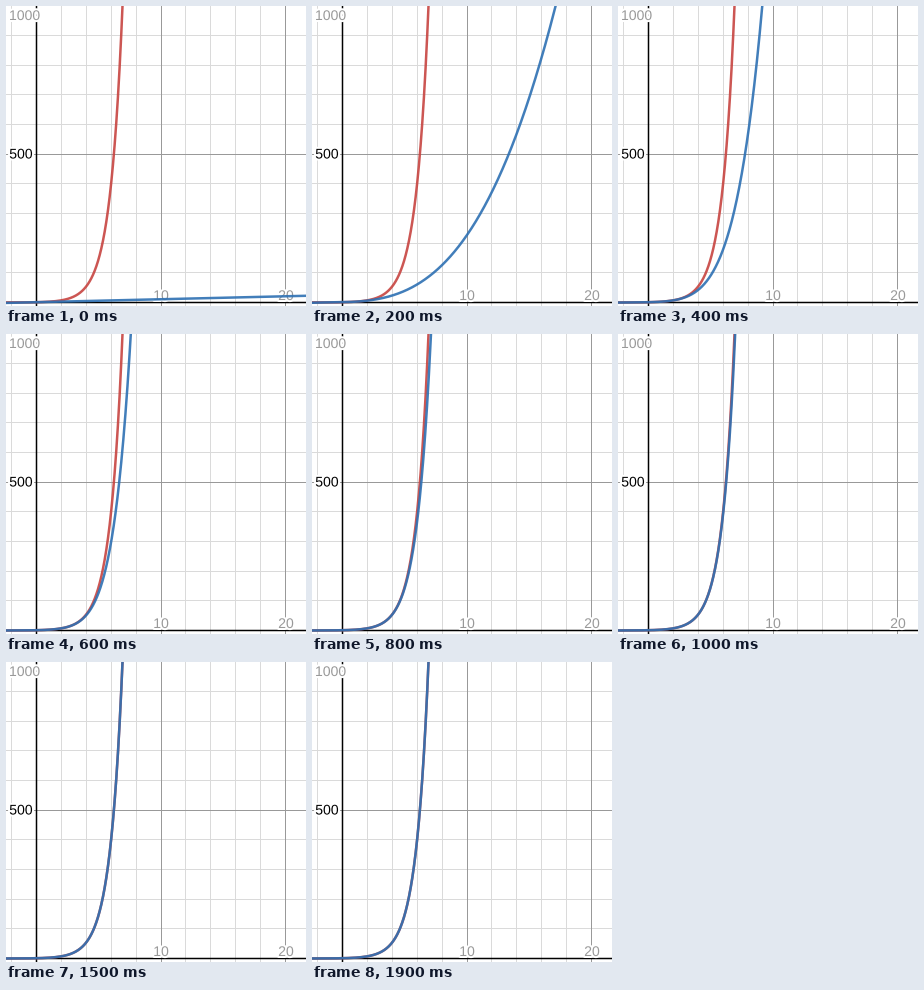
A matplotlib script for the animation above (2000 ms loop, 300 by 300 pixels).

```python
import math
import numpy as np
import matplotlib.pyplot as plt
from matplotlib.animation import FuncAnimation
from matplotlib.patheffects import withStroke

SIZE, DPI = 300, 100
PX = 72 / DPI                 # one pixel in points
X0, Y0 = 30.5, 296.5          # origin on the stage
SX, SY = 12.45, 0.2965        # pixels per unit
FRAMES, INTERVAL = 20, 100
RED, BLUE = "#c74440", "#2d70b3"

fig = plt.figure(figsize=(SIZE / DPI, SIZE / DPI), dpi=DPI, facecolor="white")
ax = fig.add_axes([0, 0, 1, 1])
ax.set_xlim(0, SIZE)
ax.set_ylim(SIZE, 0)
ax.axis("off")


def rule(pos, color, width, vertical):
    ends = [-5, SIZE + 5]
    xy = ([pos, pos], ends) if vertical else (ends, [pos, pos])
    ax.plot(*xy, color=color, lw=width * PX, zorder=1, snap=False)


def label(x, y, text, color, align="center"):
    ax.text(x, y, text, color=color, ha=align, va="baseline", zorder=2,
            family="Liberation Sans", fontsize=14 * PX,
            path_effects=[withStroke(linewidth=4 * PX, foreground="white")])


def curve(color, z):
    line, = ax.plot([], [], color=color, lw=2.5 * PX, alpha=0.9, zorder=z,
                    solid_joinstyle="round")
    return line


def place(line, y):
    keep = y < 1100
    line.set_data(X0 + SX * xs[keep], Y0 - SY * y[keep])


def taylor(degree):
    return sum(xs ** k / math.factorial(k) for k in range(degree + 1))


# Minor lines first so that major lines stay on top
for major in (False, True):
    color = "#999999" if major else "#dadada"
    for u in range(-2, 22, 2):
        if u and (u % 10 == 0) == major:
            rule(math.floor(X0 + SX * u) + 0.5, color, 1, True)
    for v in range(100, 1000, 100):
        if (v % 500 == 0) == major:
            rule(math.floor(Y0 - SY * v) + 0.5, color, 1, False)
rule(X0, "black", 1.5, True)
rule(Y0, "black", 1.5, False)

label(3, 14, "1000", "#999999", "left")
label(26.5, 152.5, "500", "black", "right")
label(155, 294, "10", "#999999")
label(280, 294, "20", "#999999")

xs = np.linspace(-3, 22, 1500)
exp_line = curve(RED, 3)
sum_line = curve(BLUE, 4)
place(exp_line, np.exp(xs))


def update(i):
    place(sum_line, taylor(i + 1))
    return sum_line,


def init():
    return update(0)


anim = FuncAnimation(fig, update, frames=FRAMES, init_func=init,
                     interval=INTERVAL, repeat=True, repeat_delay=0)
plt.show()
```
